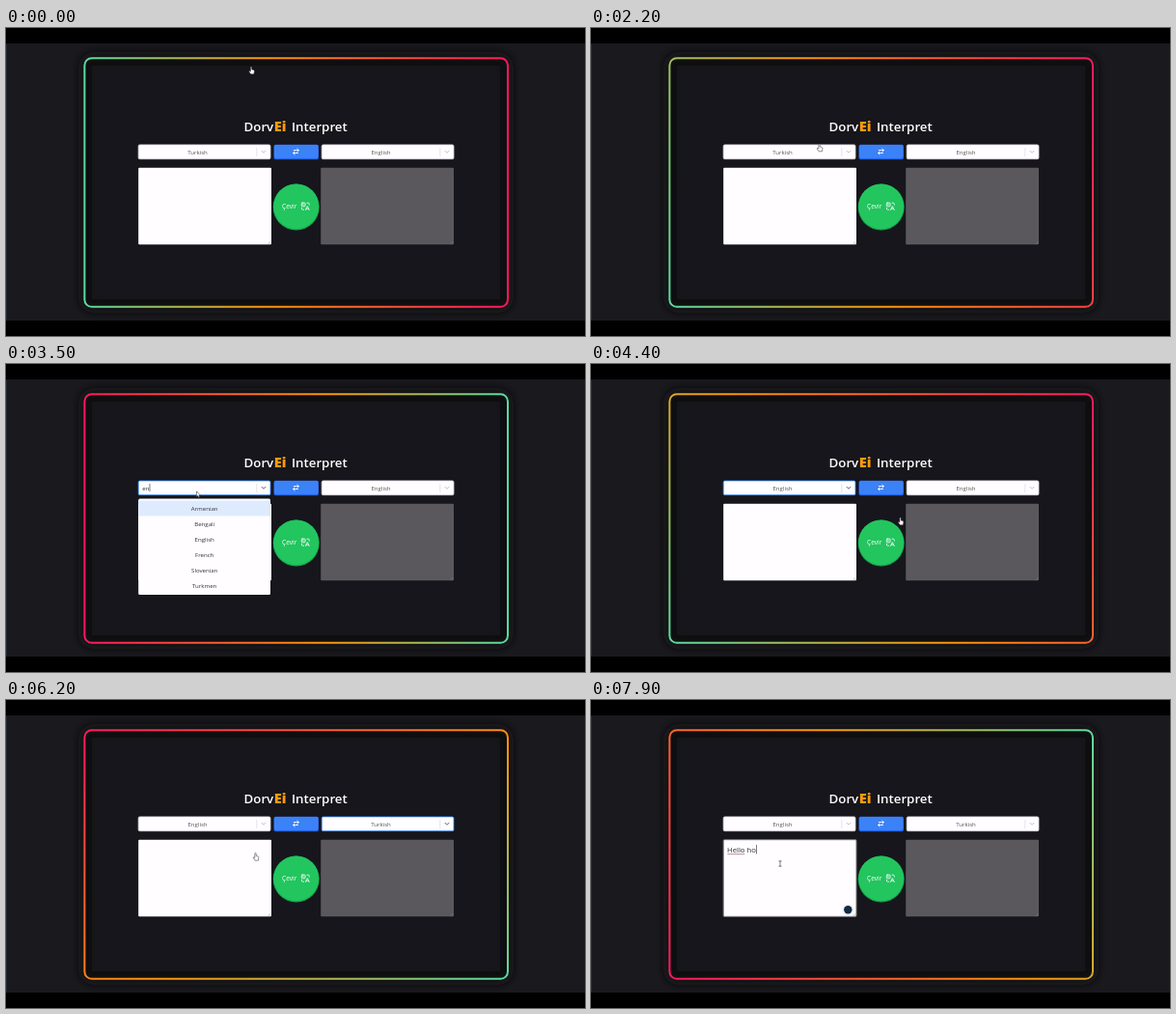
An HTML page for the animation above (8000 ms loop, 600x319 px).

```html
<!DOCTYPE html>
<html lang="en">
<head>
<meta charset="utf-8">
<title>DorvEi Interpret</title>
<style>
  html, body { margin: 0; width: 100%; height: 100%; overflow: hidden; background: #000; }
  svg { display: block; width: 100vw; height: 100vh; }
  text { font-family: "Open Sans", "Noto Sans", sans-serif; font-size: 6.1px; fill: #333; white-space: pre; }
  .mid { text-anchor: middle; }
  .title { font-size: 13.3px; font-weight: 600; fill: #fff; }
  .accent { font-size: 14.6px; font-weight: 800; fill: #ff9a0c; }
  .line { fill: none; stroke-linecap: round; stroke-linejoin: round; }
</style>
</head>
<body>
<svg id="stage" viewBox="0 0 600 319">
  <defs>
    <linearGradient id="rim" gradientUnits="userSpaceOnUse">
      <stop offset="0" stop-color="#58dca6"/>
      <stop offset=".43" stop-color="#ff9708"/>
      <stop offset="1" stop-color="#ff1663"/>
    </linearGradient>
    <filter id="soft" x="-10%" y="-10%" width="120%" height="120%">
      <feGaussianBlur stdDeviation="4.5"/>
    </filter>
  </defs>
  <rect y="16" width="600" height="287" fill="#1a191e"/>
  <rect y="17" width="1" height="286" fill="#1d2a3a"/>
  <rect x="82" y="32" width="437" height="256" rx="9" fill="#18171b" stroke="#0c0b0e"
        stroke-width="14" stroke-opacity=".75" filter="url(#soft)"/>
  <rect x="81.4" y="31.2" width="438.6" height="257.6" rx="7.5" fill="none" stroke="url(#rim)" stroke-width="2"/>

  <text class="title" x="246.5" y="107.3">Dorv</text>
  <text class="accent" x="277.8" y="107.3">Ei</text>
  <text class="title" x="296" y="107.3">Interpret</text>

  <rect x="277.5" y="120.7" width="46.5" height="15.6" rx="2" fill="#2563eb"/>
  <rect x="278" y="121" width="45.5" height="13.9" rx="1.8" fill="#3b82f6"/>
  <path class="line" stroke="#fff" stroke-width=".9"
        d="M298.3 126.6H303.3M301.8 125.1L303.4 126.6L301.8 128.1M302.5 129.5H297.6M299.1 128L297.5 129.5L299.1 131"/>

  <rect id="area" x="137.2" y="144.7" width="137.8" height="79.6" rx="1" fill="#fffdff"/>
  <rect x="326.2" y="144.7" width="137.8" height="79.6" rx="1" fill="#5a585d"/>
  <path class="line" stroke="#888" stroke-width=".4" d="M271.7 223.5L274.2 221M273.2 223.5L274.2 222.5M460.7 223.5L463.2 221M462.2 223.5L463.2 222.5"/>

  <circle cx="300.7" cy="185.5" r="24" fill="#16a34a"/>
  <circle cx="300.7" cy="184.9" r="23.4" fill="#22c55e"/>
  <text x="286" y="187.2" style="font-size:6.6px;fill:#fff">Çevir</text>
  <g class="line" stroke="#fff" stroke-width=".8">
    <rect x="306.3" y="181" width="3.8" height="3.8" rx=".8"/>
    <path d="M307.3 182.9H309.1M312 181.2H313.2Q314.3 181.2 314.3 182.4V183.2M306.4 186.2V187Q306.4 188.2 307.6 188.2H308.6M310.5 188.5L312.3 184.6L314.2 188.5M311.2 187.2H313.5"/>
  </g>

  <g id="note">
    <circle cx="266.3" cy="217.3" r="6" fill="#f1f0f4"/>
    <circle cx="266.3" cy="217.3" r="4.2" fill="#0f2b46"/>
    <text id="typed" x="141" y="157.6" style="font-size:7.7px"></text>
    <path id="spell" stroke="#b0605f" stroke-width=".7" d="M141.3 159.6H159.3"/>
    <rect id="caret" y="150" width=".6" height="9.5" fill="#222"/>
  </g>
  <g id="selects"></g>
  <g id="pointer">
    <path id="hand" fill="#fff" stroke="#222" stroke-width=".5" stroke-linejoin="round"
          d="M-1.1 -3.6Q-.4 -4.4 .2 -3.6V-1L2.2 -.5Q3 -.2 2.9 .8L2.4 3.8H-.9L-2.7 1.1Q-2.8 .2 -1.9 .4L-1.1 1.1Z"/>
    <path id="arrow" fill="#fff" stroke="#222" stroke-width=".5" stroke-linejoin="round"
          d="M-1.5 -2.7V3L-.2 1.9L.7 3.8L1.6 3.4L.8 1.6H2.4Z"/>
    <path id="beam" class="line" stroke="#333" stroke-width=".6" d="M-1.2 -2.6H1.2M0 -2.6V2.6M-1.2 2.6H1.2"/>
  </g>
</svg>
<script>
const LOOP = 8000, SPIN = 7000 / 3, ROWS = 7, ROW_H = 16;
const LANGS = ("Afrikaans Albanian Arabic Armenian Bengali Bosnian Bulgarian Catalan Chinese Croatian " +
  "Czech Danish Dutch English Estonian Finnish French German Greek Hindi Hungarian Italian Japanese " +
  "Korean Latvian Polish Portuguese Romanian Russian Serbian Slovenian Spanish Swedish Thai Turkish " +
  "Turkmen Ukrainian Urdu").split(" ");

// Pointer stops: time, x, y
const PATH = [
  [0, 254.5, 44], [900, 254.5, 44], [2000, 237, 124], [2500, 237, 124], [2900, 199, 134.5],
  [3500, 199, 134.5], [3850, 204, 182], [3980, 204, 182], [4400, 321, 163], [4750, 380, 129],
  [4900, 380, 129], [5300, 364.5, 150.5], [5850, 364.5, 150.5], [6450, 196, 169.5]
];
const SHAPES = [[0, "hand"], [2500, "arrow"], [4050, "hand"], [4850, "arrow"], [5900, "hand"], [6350, "beam"]];
const NOTE = "Hello ho", NOTE_START = 7150, NOTE_STEP = 100, NOTE_FOCUS = 6500;

const $ = id => document.getElementById(id);
const show = (node, on) => node.setAttribute("display", on ? "inline" : "none");
const at = (steps, t) => steps.filter(s => s[0] <= t).pop();

function add(parent, tag, attrs) {
  const node = document.createElementNS("http://www.w3.org/2000/svg", tag);
  for (const key in attrs) node.setAttribute(key, attrs[key]);
  return parent.appendChild(node);
}

function makeSelect(x, opts) {
  const root = add($("selects"), "g", { transform: `translate(${x} 0)` });
  const box = add(root, "rect", { x: 0.2, y: 120.9, width: 136.8, height: 14.8, rx: 1.5, fill: "#fffdff", "stroke-width": 0.8 });
  add(root, "path", { d: "M122.8 124V133", stroke: "#ccc", "stroke-width": 0.5 });
  const chevron = add(root, "path", { class: "line", d: "M128 127.3L130 129.3L132 127.3", "stroke-width": 0.9 });
  const value = add(root, "text", { class: "mid", x: 61.5, y: 130.6, style: "fill:#555" });
  const query = add(root, "text", { x: 4.3, y: 130.6 });
  const caret = add(root, "rect", { y: 124, width: 0.6, height: 8, fill: "#222" });
  const menu = add(root, "g", {});
  const sheet = add(menu, "rect", { x: 0.2, y: 139.5, width: 136.8, rx: 1.5, fill: "#fffdff" });
  const marks = [], labels = [];
  for (let i = 0; i < ROWS; i++) {
    marks.push(add(menu, "rect", { x: 0.2, y: 141.4 + i * ROW_H, width: 136.8, height: ROW_H }));
    labels.push(add(menu, "text", { class: "mid", x: 68.7, y: 151.7 + i * ROW_H }));
  }

  return (t, px, py) => {
    const focused = t >= opts.open && t < opts.blur;
    const open = t >= opts.open && t < opts.pick;
    const chosen = t < opts.pick ? opts.from : opts.to;
    const word = open ? (at(opts.keys, t) || [0, ""])[1] : "";

    box.setAttribute("stroke", focused ? "#2684ff" : "#d8d7dc");
    chevron.setAttribute("stroke", focused ? "#555" : "#bbb");
    value.textContent = word ? "" : chosen;
    query.textContent = word;
    show(caret, word);
    if (word) caret.setAttribute("x", 4.5 + query.getComputedTextLength());
    show(menu, open);
    if (!open) return;

    const first = word ? 0 : Math.max(0, LANGS.indexOf(chosen) - ROWS + 1);
    const list = LANGS.filter(l => l.toLowerCase().includes(word)).slice(first, first + ROWS);
    const hover = Math.floor((py - 141.4) / ROW_H);
    const inside = px > x && px < x + 137 && hover >= 0 && hover < list.length;
    const active = inside ? hover : 0;
    sheet.setAttribute("height", list.length * ROW_H + 3.6);
    labels.forEach((label, i) => {
      const picked = list[i] === chosen;
      label.textContent = list[i] || "";
      label.style.fill = picked ? "#fff" : "#333";
      marks[i].setAttribute("fill", picked ? "#2684ff" : "#deebff");
      show(marks[i], picked || i === active && (word || inside));
    });
  };
}

const selects = [
  makeSelect(137, { from: "Turkish", to: "English", open: 2550, pick: 3950, blur: 4850,
    keys: [[3050, "e"], [3300, "en"]] }),
  makeSelect(327, { from: "English", to: "Turkish", open: 4850, pick: 5800, blur: NOTE_FOCUS,
    keys: [[5000, "t"], [5130, "tu"], [5260, "tur"], [5390, "turk"]] })
];

function pointerAt(t) {
  const i = PATH.findIndex(p => p[0] > t);
  if (i < 0) return PATH[PATH.length - 1].slice(1);
  const [t0, x0, y0] = PATH[i - 1], [t1, x1, y1] = PATH[i];
  const u = (t - t0) / (t1 - t0), e = u * u * (3 - 2 * u);
  return [x0 + (x1 - x0) * e, y0 + (y1 - y0) * e];
}

// Same geometry as a CSS linear-gradient at a given angle
function turnRim(t) {
  const a = Math.PI / 2 + t / SPIN * 2 * Math.PI, s = Math.sin(a), c = Math.cos(a);
  const half = 220 * Math.abs(s) + 130 * Math.abs(c);
  const ends = { x1: 300.5 - s * half, y1: 160 + c * half, x2: 300.5 + s * half, y2: 160 - c * half };
  for (const key in ends) $("rim").setAttribute(key, ends[key]);
}

function drawNote(t) {
  const focused = t >= NOTE_FOCUS;
  const count = Math.max(0, Math.floor((t - NOTE_START) / NOTE_STEP) + 1);
  const text = NOTE.slice(0, count);
  $("area").setAttribute("stroke", focused ? "#77757b" : "none");
  show($("note"), focused);
  $("typed").textContent = text;
  show($("spell"), text.length > 5);
  show($("caret"), text);
  if (text) $("caret").setAttribute("x", 141.2 + $("typed").getComputedTextLength());
}

function draw(now) {
  const t = now % LOOP, [px, py] = pointerAt(t), shape = at(SHAPES, t)[1];
  turnRim(t);
  drawNote(t);
  selects.forEach(update => update(t, px, py));
  $("pointer").setAttribute("transform", `translate(${px} ${py})`);
  for (const id of ["hand", "arrow", "beam"]) show($(id), id === shape);
}

const start = performance.now();
function tick() {
  draw(performance.now() - start);
  requestAnimationFrame(tick);
}
tick();
</script>
</body>
</html>
```
